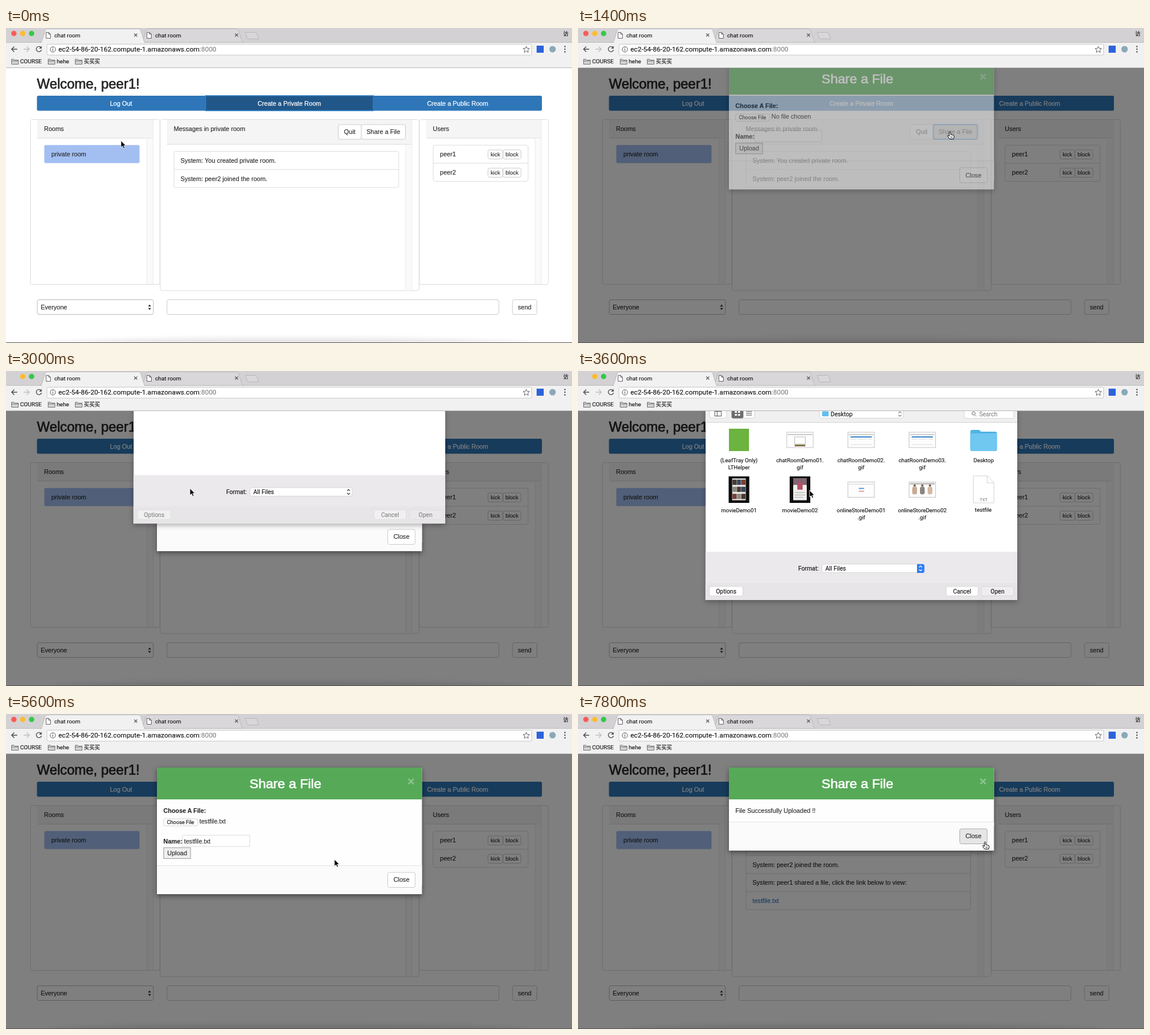
These frames come from a looping animation (960 by 535 pixels, 8000 ms). An HTML page:

```html
<!DOCTYPE html>
<html lang="en">
<head>
<meta charset="utf-8">
<title>chat room</title>
<style>
html, body { margin: 0; width: 100%; height: 100%; overflow: hidden; background: #fff; }
svg { display: block; width: 100vw; height: 100vh; }
text { font: 10.6px "Liberation Sans", Arial, sans-serif; fill: #262626; stroke: #262626; stroke-width: .12px; white-space: pre; }
.ui { font: 9.7px Roboto, "Noto Sans CJK SC", "Noto Sans CJK", sans-serif; fill: #111; stroke: #111; }
.c { text-anchor: middle; }
.b { font-weight: bold; }
.w { fill: #fff; stroke: #fff; stroke-width: .25px; }
.h { stroke-width: .7px; }
.dim { fill: #777; stroke: none; }
#modal { filter: drop-shadow(0 3px 4px rgba(0,0,0,.45)); }
#sheet { filter: drop-shadow(0 3px 4px rgba(0,0,0,.3)); }
</style>
</head>
<body>
<svg id="stage" viewBox="0 0 960 535" preserveAspectRatio="none"></svg>
<script>
const LOOP = 8000, STEP = 200;

const rect = (x, y, w, h, fill, stroke = 'none', rx = 0, more = '') =>
  `<rect x="${x}" y="${y}" width="${w}" height="${h}" fill="${fill}" stroke="${stroke}" rx="${rx}" ${more}/>`;
const text = (x, y, s, cls = '', size = 0, more = '') =>
  `<text x="${x}" y="${y}" class="${cls}" ${size ? `style="font-size:${size}px"` : ''} ${more}>${s}</text>`;
const path = (d, fill = 'none', stroke = 'none', w = 1, more = '') =>
  `<path d="${d}" fill="${fill}" stroke="${stroke}" stroke-width="${w}" ${more}/>`;
const dot = (x, y, r, fill, more = '') => `<circle cx="${x}" cy="${y}" r="${r}" fill="${fill}" ${more}/>`;
const group = (id, body, more = '') => `<g id="${id}" ${more}>${body}</g>`;
const button = (x, y, w, h, label, size, more) =>
  rect(x, y, w, h, '#fff', '#ccc', 3, more) + text(x + w / 2, y + h / 2 + 3.7, label, 'c', size);

const folder = x => path(`M${x} 53h4l1.5 1.5h6v7h-11.5zM${x} 56h11.5`, '#d4d4d4', '#686868', .9);

function tab(x, w, fill) {
  return path(`M${x} 24.5c4 0 4-3 5-6l4-13c1-3 2-4 5-4h${w - 28}c3 0 4 1 5 4l4 13c1 3 1 6 5 6z`, fill, '#b3b1b3', .8) +
    path(`M${x + 11} 7.5h4.5l3 3v7h-7.5zM${x + 15.5} 7.5v3h3`, '#fff', '#555', .9) +
    text(x + 25, 15.5, 'chat room', 'ui') +
    path(`M${x + 160.5} 9.5l5 5m0-5l-5 5`, 'none', '#555', 1.1);
}

function chrome() {
  return rect(0, 0, 960, 25, '#d3d1d3') + rect(0, 24, 960, 43.5, '#f2f1f2') +
    path('M0 24.5H960', 'none', '#b3b1b3', .8) + path('M0 67.5H960', 'none', '#b9b7b9') +
    dot(13.4, 9.3, 4.5, '#fc5b57', 'id="red"') + dot(28.4, 9.3, 4.5, '#fdbc2f') + dot(43.4, 9.3, 4.5, '#34c84a') +
    tab(228, 176, '#d9d7d9') + tab(57, 181, '#f2f1f2') + path('M61 24.7H234', 'none', '#f2f1f2', 1.4) +
    path('M406 7.5h17c1.500 0 2 .5 2.500 2l3 9h-17c-1.500 0-2-.5-2.500-2z', '#d9d7d9', '#b3b1b3', .8) +
    text(949.5, 13, '访', 'ui c', 9) +
    path('M19 36H9.500m4.500-4.500L9.500 36l4.500 4.500', 'none', '#4f4f4f', 1.4) +
    path('M30 36h9.500m-4.500-4.500l4.500 4.500l-4.500 4.500', 'none', '#c0bfc0', 1.4) +
    path('M59.500 33a4.500 4.500 0 1 0 .8 4', 'none', '#4f4f4f', 1.3) + path('M60.500 30.500v4.500h-4.500z', '#4f4f4f') +
    rect(69.5, 27.5, 822, 18.5, '#fff', '#c9c8c9', 2) +
    dot(79.5, 36.3, 4.5, 'none', 'stroke="#555"') + path('M79.500 35.500v3.300m0-5.500v1.200', 'none', '#555', 1.1) +
    text(89, 40.3, 'ec2-54-86-20-162.compute-1.amazonaws.com<tspan class="dim">:8000</tspan>', 'ui', 11.55) +
    path('M882.500 31l1.500 3.600 4 .3-3 2.600.9 3.900-3.400-2.100-3.400 2.100.9-3.900-3-2.600 4-.3z', 'none', '#555', .9) +
    rect(900, 30, 12, 12, '#2c63db') + dot(927, 36, 5.5, '#8aa9b8') +
    [31.5, 36, 40.5].map(y => dot(948, y, 1.2, '#4f4f4f')).join('') +
    folder(9.5) + text(24, 60.3, 'COURSE', 'ui') + folder(71.5) + text(86, 60.3, 'hehe', 'ui') +
    folder(117.5) + text(132, 60.3, '买买买', 'ui', 9.2);
}

function panel(x, w, bottom, hx, hw, hb, title) {
  return rect(x, 155.5, w, bottom - 155.5, '#fff', '#ddd', 3) +
    rect(hx, 156, hw, hb - 156, '#f5f5f5') + path(`M${hx} ${hb}h${hw}`, 'none', '#ddd') +
    rect(hx + hw - 11, hb + .5, 11, bottom - hb - 1, '#fafafa') +
    path(`M${hx + hw - 10.5} ${hb}V${bottom}M${hx + hw} 156V${bottom}`, 'none', '#ececec') +
    text(hx + 11.5, 175, title);
}

const userRow = (name, y) => text(736, y + 19, name) +
  button(817.5, y + 8, 25, 15.5, 'kick', 9.4) + button(843, y + 8, 30.5, 15.5, 'block', 9.4);
const msgRow = (s, i, more = '') => text(296, 228.7 + 30.8 * i, s, '', 0, more);

function page() {
  return rect(0, 68, 960, 467, '#fff') + text(52.5, 102.8, 'Welcome, peer1!', 'h', 23.1) +
    rect(52.5, 115, 856.5, 25.4, '#2e76b8', 'none', 2.5) +
    path('M338.200 115v25.400M623.700 115v25.400', 'none', '#2868a4') +
    rect(338.5, 115, 284.5, 25.4, '#215788', '#2f80c8', 0, 'id="focus" stroke-width="1.6"') +
    text(195, 131.6, 'Log Out', 'c w') + text(480.5, 131.6, 'Create a Private Room', 'c w') +
    text(766, 131.6, 'Create a Public Room', 'c w') +
    panel(41.5, 219.5, 435.5, 53, 196.5, 187, 'Rooms') +
    panel(261.5, 439, 446, 273, 415.5, 197.5, 'Messages in private room') +
    panel(701, 219, 435.5, 712.5, 195.5, 187, 'Users') +
    rect(65, 198.8, 161.5, 30.7, '#a3bff2', 'none', 2.5) + text(77, 218, 'private room') +
    button(563.5, 164, 39, 25, 'Quit') + button(602.5, 164, 75, 25, 'Share a File', 0, 'id="share"') +
    rect(285, 209.5, 381, 61.5, '#fff', '#ddd', 3, 'id="list"') + path('M285 240.200h381', 'none', '#ddd') +
    msgRow('System: You created private room.', 0) + msgRow('System: peer2 joined the room.', 1) +
    group('news', path('M285 271h381M285 301.800h381', 'none', '#ddd') +
      msgRow('System: peer1 shared a file, click the link below to view:', 2) +
      msgRow('testfile.txt', 3, 'style="fill:#2a78bd;stroke:#2a78bd"')) +
    rect(724.5, 199, 161, 61.5, '#fff', '#ddd', 3) + path('M724.500 229.700h161', 'none', '#ddd') +
    userRow('peer1', 199) + userRow('peer2', 230) +
    rect(53, 461.5, 197, 25, '#fff', '#bbb', 3) + text(59, 478, 'Everyone') +
    path('M241 473l2.500-3.500 2.500 3.500zM241 475.500l2.500 3.500 2.500-3.500z', '#333') +
    rect(273, 461.5, 563, 25, '#fff', '#ccc', 3) + button(859, 461.5, 41.5, 25, 'send') +
    `<ellipse cx="481" cy="538" rx="408" ry="11" fill="#000" opacity=".11" filter="url(#soft)"/>`;
}

function modal() {
  return rect(256, 91, 449.5, 200, '#fefefe', 'none', 0, 'id="body"') + rect(256, 91, 449.5, 54, '#56a957') +
    text(474, 126, 'Share a File', 'c w h', 22.6) +
    path('M682.500 110l9 9m0-9l-9 9', 'none', '#fff', 2.8, 'opacity=".3"') +
    group('form', text(267, 168, 'Choose A File:', 'b', 10.45) +
      rect(267.5, 178, 57.5, 12, '#fff', '#d2d2d2', 2) + text(296, 187.2, 'Choose File', 'ui c', 8.85) +
      text(328, 185.7, '', '', 0, 'id="picked"') + text(267, 219.5, 'Name:', 'b', 10.6) +
      rect(299.5, 206, 114, 19, '#fff', '#ddd') + text(302, 219.5, '', '', 0, 'id="name"') +
      rect(267.5, 227, 45.5, 18.5, '#efefef', '#9c9c9c') + text(290.3, 240, 'Upload', 'c')) +
    group('done', text(267, 168, 'File Successfully Uploaded !!')) +
    group('foot', rect(256, 257, 449.5, 49, '#fbfbfb') + path('M256 257.500h449.500', 'none', '#e4e4e4') +
      button(647.5, 269, 46.5, 25.5, 'Close', 0, 'id="close"'));
}

// Icons are drawn around their own centre.
const at = (x, y, body) => `<g transform="translate(${x} ${y})">${body}</g>`;
const label = (x, y, a, b = '') => text(x, y, a, 'ui c', 9.4) + (b && text(x, y + 12, b, 'ui c', 9.4));
const shot = body => rect(-22.5, -13, 45, 26, '#fdfdfd', '#c4c4c4', 0) + body;
const bars = rect(-21, -10, 42, 2, '#cfcfcf') + rect(-18, -6, 36, 2, '#3c86cb') +
  path('M-18-1h9M-6-1H8M11-1h7M-18 8H18', 'none', '#ddd');

function posters(light) {
  let s = rect(-17.5, -22.5, 35, 45, '#0e0e0e') + rect(-11.5, -19, 23, 37, '#f1efee');
  if (light) return s + rect(-11.5, -19, 23, 11, '#806473') + rect(-4.5, -13, 9, 13, '#b05265') +
    path('M-9 5H9M-9 9H9M-9 13H5', 'none', '#aaa');
  const tones = ['#4a3a34', '#8d8a84', '#7d4038', '#39485a'];
  for (let i = 0; i < 9; i++)
    s += rect(-11 + i % 3 * 7.5, -17 + Math.floor(i / 3) * 12, 7, 9, tones[i * 3 % 4]);
  return s;
}

function files() {
  const cols = [273, 376.5, 480.3, 584, 688];
  const people = [-13, 0, 13].map((x, i) => rect(x - 4, -5, 8, 13, ['#c9aa94', '#8b8581', '#d5b9a3'][i], 'none', 3) +
    dot(x, -7, 2, '#775f52')).join('');
  return at(273, 117, rect(-17, -19, 34, 38, '#6cb33f')) +
    at(cols[1], 117, shot(rect(-21, -10, 42, 2, '#ccc') + rect(-9, -5, 18, 12, '#fff', '#bbb') + rect(-9, 8, 18, 3, '#85734c'))) +
    at(cols[2], 117, shot(bars)) + at(cols[3], 117, shot(bars)) +
    path('M665.500 103c0-2 1-3 3-3h12l3 3h24c2 0 3 1 3 3v27c0 2-1 3-3 3h-39c-2 0-3-1-3-3z', '#50b4e4') +
    rect(665.5, 106, 45, 30, '#70c7f0', 'none', 2) +
    label(273, 155, '(LeafTray Only)', 'LTHelper') +
    [1, 2, 3].map(i => label(cols[i], 155, `chatRoomDemo0${i}.`, 'gif')).join('') + label(688, 155, 'Desktop') +
    at(273, 201.5, posters(false)) + at(cols[1], 201.5, posters(true)) +
    at(cols[2], 201.5, shot(rect(-21, -10, 42, 1.5, '#ddd') + rect(-4, -3, 9, 2, '#5b9ee0') + rect(-4, 2, 9, 1.5, '#d58b9b'))) +
    at(cols[3], 201.5, shot(rect(-21, -11, 42, 2, '#aaa') + people)) +
    label(273, 239.5, 'movieDemo01') + label(cols[1], 239.5, 'movieDemo02') +
    label(cols[2], 239.5, 'onlineStoreDemo01', '.gif') + label(cols[3], 239.5, 'onlineStoreDemo02', '.gif') +
    group('mark', rect(661, 175, 54, 53.5, '#dadada', 'none', 3) + rect(669.5, 230, 35.5, 12, '#1664da', 'none', 2)) +
    path('M670.500 178h23.500l11.500 12v34h-35zM694 178v12h11.500', '#fff', '#c8c8c8', .8) +
    text(688, 220.5, 'TXT', 'ui c dim', 7.5) + text(687.3, 239.3, 'testfile', 'ui c', 9.4, 'id="pick"');
}

function sheet() {
  const key = (x, w, s, id) => rect(x, 366, w, 16, '#fff', '#d3d1d3', 3, `id="${id}" stroke-width=".8"`) +
    text(x + w / 2, 377.8, s, 'ui c', 10);
  return rect(216.5, 60, 528.5, 329, '#fff') +
    group('browser', rect(216.5, 60, 528.5, 27, '#f1f0f1') + path('M216.500 87.300H745', 'none', '#d3d1d3') +
      rect(223, 62, 29, 18, '#fff', '#d8d6d8', 3) + rect(232, 68.5, 11, 8, 'none', '#555') + path('M236 68.500v8', 'none', '#555') +
      rect(260.5, 62, 39, 18, '#fff', '#d8d6d8', 3) + rect(260.5, 62, 20, 18.5, '#6e6c6e', 'none', 3) +
      path('M266 69.500h3.500m2 0h3.500M266 74.500h3.500m2 0h3.500', 'none', '#fff', 3) +
      path('M285 69h10m-10 3h10m-10 3h10', 'none', '#555') +
      rect(409.5, 62, 142, 18, '#fff', '#d8d6d8', 3) + rect(414, 68.5, 11, 8.5, '#62bfee', 'none', 1) +
      text(428.5, 76.6, 'Desktop', 'ui', 10.2) + path('M543.500 71.500l2.500-2.500 2.500 2.500m-5 3l2.500 2.500 2.500-2.500', 'none', '#444') +
      rect(655, 62, 84, 18.5, '#fff', '#d8d6d8', 3) + dot(671, 72, 2.8, 'none', 'stroke="#777"') +
      path('M673 74.500l2.500 2.500', 'none', '#777') + text(680.5, 76.6, 'Search', 'ui dim', 10) + files()) +
    rect(216.5, 307, 528.5, 82, '#ebe9eb') + rect(216.5, 360, 528.5, 29, '#e7e5e7') +
    text(373.5, 338.5, 'Format:', 'ui', 10.1) + rect(414, 328, 173, 14.500, '#fff', '#d0ced0', 3, 'stroke-width=".8"') +
    text(419.5, 338.8, 'All Files', 'ui', 10.1) + path('M575 328h9.500q3 0 3 3v9q0 3-3 3h-9.500z', '#2f7df2', 'none', 1, 'id="cap"') +
    path('M578.500 333.500l2.500-2.500 2.500 2.500m-5 3.500l2.500 2.500 2.500-2.500', 'none', '#333', 1.2, 'id="chev"') +
    group('keys', key(223, 56.5, 'Options', 'k1') + key(624.5, 54, 'Cancel', 'k2') + key(684, 55, 'Open', 'k3'));
}

document.getElementById('stage').innerHTML =
  `<defs><filter id="soft" x="-10%" y="-100%" width="120%" height="300%"><feGaussianBlur stdDeviation="4"/></filter>
   <clipPath id="view"><rect y="68" width="960" height="467"/></clipPath></defs>` +
  `<g clip-path="url(#view)">` + page() + rect(0, 68, 960, 467, '#000', 'none', 0, 'id="dim"') +
  group('modal', modal()) + group('sheet', sheet()) + rect(0, 534, 960, 1, '#555') + '</g>' + chrome() +
  group('arrow', path('M0 0v11.500l2.700-2.400 1.900 4 2-.9-1.900-3.900h3.600z', '#000', '#fff', .8)) +
  group('hand', path('M-1.200 1q1.200-2 2.400 0v4l4 1q2 .5 1.700 2.500l-1 4h-6.500l-3.500-5q-.2-1.700 1.400-1l1.500 1.300z', '#fff', '#000', 1) +
    path('M1.500 8v3m2-3v3', 'none', '#000', .7));

const $ = {};
document.querySelectorAll('#stage [id]').forEach(e => $[e.id] = e);
const set = (id, k, v) => $[id].setAttribute(k, v);
const show = (id, on) => set(id, 'visibility', on ? 'visible' : 'hidden');
const clamp = v => Math.max(0, Math.min(1, v));
const ramp = (t, from, span) => clamp((t - from) / span);

// Pointer stops: time, x, y
const stops = [[0, 195, 191.5], [900, 631, 176], [1500, 631, 176], [2300, 311, 185], [3000, 312, 199.5],
  [3300, 312, 199.5], [4300, 686, 214], [4600, 684, 223], [4900, 684, 223], [5600, 557, 247],
  [6300, 292, 237], [6700, 292, 237], [7500, 676, 212], [7800, 690.5, 217]];

function pointer(t) {
  const i = stops.findIndex(s => s[0] > t);
  if (i < 0) return stops[stops.length - 1].slice(1);
  const [a, b] = [stops[i - 1], stops[i]];
  const p = ramp(t, a[0], b[0] - a[0]), e = p * p * (3 - 2 * p);
  return [a[1] + (b[1] - a[1]) * e, a[2] + (b[2] - a[2]) * e];
}

function draw(t) {
  const [x, y] = pointer(t);
  const onShare = t < 1600 && x > 603 && x < 678, pressed = t >= 1000;
  const sent = t >= 6800, chosen = t >= 5000;
  const onClose = sent && x > 647 && x < 694 && y > 195 && y < 221;

  show('focus', !pressed);
  set('share', 'fill', pressed ? '#d4d4d4' : onShare ? '#e6e6e6' : '#fff');
  set('share', 'stroke', pressed ? '#4b93dc' : '#ccc');
  set('share', 'stroke-width', pressed ? 2 : 1);
  show('news', sent);
  set('list', 'height', sent ? 123 : 61.5);

  set('dim', 'opacity', .5 * ramp(t, 1100, 200));
  const m = ramp(t, 1300, 200);
  set('modal', 'opacity', m);
  set('modal', 'transform', `translate(0 ${-63.5 * (1 - m)})`);
  set('body', 'height', sent ? 100 : 200);
  set('foot', 'transform', `translate(0 ${sent ? -74 : 0})`);
  set('close', 'fill', onClose ? '#e6e6e6' : '#fff');
  set('close', 'stroke', onClose ? '#adadad' : '#ccc');
  show('form', !sent);
  show('done', sent);
  $.picked.textContent = chosen ? 'testfile.txt' : 'No file chosen';
  $.name.textContent = chosen ? 'testfile.txt' : '';

  const open = Math.min(ramp(t, 2800, 336), 1 - ramp(t, 4700, 200));
  const ready = t >= 3200, marked = t >= 4400;
  set('sheet', 'display', open > 0 ? 'inline' : 'none');
  set('sheet', 'transform', `translate(0 ${-321 * (1 - open)})`);
  set('browser', 'display', ready ? 'inline' : 'none');
  show('cap', ready);
  set('chev', 'stroke', ready ? '#fff' : '#333');
  set('keys', 'opacity', ready ? 1 : .45);
  set('k3', 'fill', marked ? '#dfdddf' : '#efedef');
  show('mark', marked);
  $.pick.style.fill = $.pick.style.stroke = marked ? '#fff' : '#111';
  set('red', 'fill', open > 0 ? '#d3d1d3' : '#fc5b57');

  const hand = onShare || onClose;
  show('arrow', !hand);
  show('hand', hand);
  set(hand ? 'hand' : 'arrow', 'transform', `translate(${x} ${y})`);
}

function tick(now) {
  draw(Math.floor(now % LOOP / STEP) * STEP);
  requestAnimationFrame(tick);
}
draw(0);
requestAnimationFrame(tick);
</script>
</body>
</html>
```
